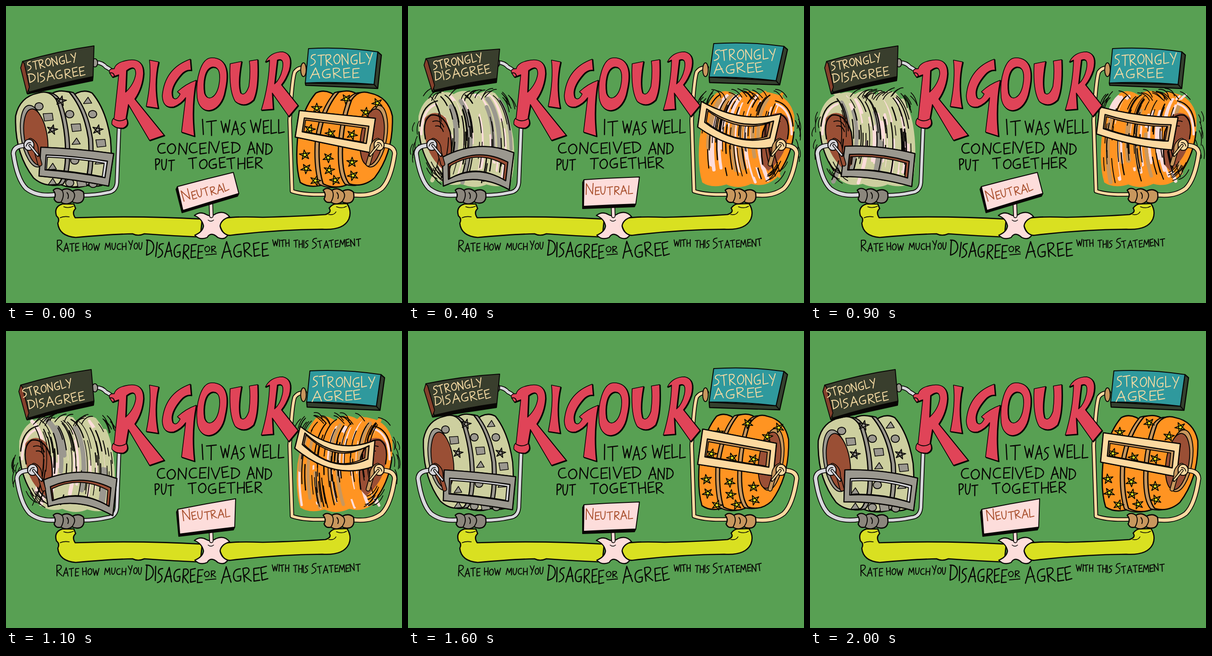
These frames come from a looping animation (864 px wide and 648 px high, 2.1 s). An HTML page:

```html
<!DOCTYPE html>
<html lang="en">
<head>
<meta charset="utf-8">
<title>Rigour</title>
<style>
html, body { margin: 0; width: 100%; height: 100%; overflow: hidden; background: #58a053; }
svg { display: block; width: 100vw; height: 100vh; }
path { stroke-linecap: round; stroke-linejoin: round; }
</style>
</head>
<body>
<svg id="stage" viewBox="0 0 864 648" role="img" aria-label="Rigour: it was well conceived and put together. Rate how much you disagree or agree with this statement. Strongly disagree, neutral, strongly agree."></svg>
<script>
const INK = '#080605', GREY = '#9b988f', PALE = '#d8d8dc', BROWN = '#9a4f35',
      TAN = '#c8975d', CREAM = '#fcd9a0', RED = '#e04458', LIME = '#d9e021',
      PINK = '#fddddb', BEIGE = '#cdcf9f', ORANGE = '#ff9422', SAND = '#f6dba3';

// Hand lettering: [width, strokes] on a cap height of 10.
const GLYPHS = {
  A: [7, 'M0 10.5L3.8 0L7 10M1.3 6.8L6.3 6'],
  C: [6, 'M5.6 1Q1 0 .4 5.5Q1 11 6 8.6'],
  D: [6.5, 'M.8 .8L.6 10Q7 8.5 6.3 4Q5 .3 0 .8'],
  E: [5, 'M5 .2L.4 .8L.6 9.7L5.2 9M.5 5.2L4.3 4.6'],
  G: [7, 'M5.8 .8Q.4 1 .4 6Q1 11 6 8.8L6.3 5.8L3.6 6.2'],
  H: [6, 'M.3 .3L.5 10M5.7 0L5.8 10M.4 5.6L5.8 4.8'],
  I: [1, 'M.6 0L.5 10'],
  L: [5, 'M.6 0L.4 9.8L5.2 9'],
  M: [8, 'M0 10L1.4 .8L4.3 7L7 .2L8 10'],
  N: [6.5, 'M.3 10L.4 .4L5.7 9.6L6.2 0'],
  O: [6.5, 'M3.6 1.2Q0 2.6 .4 6.2Q1.2 10.6 4.6 9Q7.6 6 5.8 2.4Q4.6 .6 3 1.4'],
  P: [5, 'M.6 10L.5 .6Q5.4 -.4 5 2.8Q4 5.6 .6 6'],
  R: [6, 'M.6 10L.5 .6Q5.6 -.4 5.2 2.6Q4 5 .8 5.6L6 10'],
  S: [5, 'M5 .6Q.4 .6 .9 3.8Q5 5.4 4.4 7.6Q3.2 9.8 0 10.4'],
  T: [6.5, 'M0 1L6.5 .2M3.2 .7L3.3 10'],
  U: [6, 'M.4 .4Q0 9 2.6 9.6Q5.4 9.4 5.6 0'],
  V: [6.5, 'M0 .4L3.2 9.8L6.4 0'],
  W: [9, 'M0 .6L2.4 9.6L4.6 2.6L6.6 9.4L9 0'],
  Y: [6, 'M0 .4L2.9 5M6 0L2 10.6']
};

const TITLE = [
  'M232 155L226 146Q223 136 236 137Q240 122 268 118Q300 114 300 147Q298 178 281 203L345 282L313 293L267 215L262 244Q270 260 256 266Q240 268 231 258Q230 248 236 244L246 150ZM263 141Q283 126 283 148Q280 170 261 188Z',
  'M313 118L333 122Q322 170 332 223L306 219Q318 160 313 118Z',
  'M402 116Q346 136 341 196Q342 224 366 220Q382 214 392 200L383 275L411 284Q404 220 415 162Q392 170 374 187L380 192Q372 208 364 200Q356 180 382 150Q392 138 404 140Z',
  'M449 113C485 113 486 150 478 185C470 235 423 243 417 200C413 160 425 113 449 113ZM451 133C432 136 430 170 433 190C440 210 458 200 464 175C469 150 466 132 451 133Z',
  'M489 126L514 121Q505 170 512 190Q522 198 530 175Q534 145 531 120L549 117Q552 180 540 205Q520 224 500 208Q486 185 489 126Z',
  'M566 122Q577 100 604 100Q627 105 618 140Q611 160 601 172L637 217L617 241L581 190L583 225L557 227Q574 170 575 118ZM592 118Q608 112 603 138Q598 160 586 170Z'
];

// Rows: text, x, baseline, height, angle, condensing, size of the first letter.
const BODY = [
  ['IT', 429, 282, 33, 0, 1], ['WAS', 470, 279, 28, 0, .76], ['WELL', 534, 279, 30, -1, .84],
  ['CONCEIVED', 330, 324, 25, -1, 1.17], ['AND', 527, 323, 25, 0, .92],
  ['PUT', 326, 358, 24, 0, .82], ['TOGETHER', 399, 356, 24, -1, 1.12],
  ['RATE', 111, 535, 18, 0, .85, 1.35], ['HOW', 168, 533, 16, 0, .9], ['MUCH', 216, 532, 15, 0, 1],
  ['YOU', 268, 531, 16, 0, .8, 1.15], ['DISAGREE', 305, 545, 31, 3, .73, 1.15], ['OR', 434, 538, 14, -2, 1.25],
  ['AGREE', 471, 550, 31, -3, .88, 1.1], ['WITH', 582, 525, 15, -1, .88], ['THIS', 628, 527, 16, 0, .84],
  ['STATEMENT', 668, 529, 16, -3, .94, 1.4]
];

const DRUM = [
  'M140 200Q165 178 188 190Q218 225 228 290Q233 350 222 385Q200 400 165 388Z',
  'M85 205Q105 178 138 188Q170 225 180 290Q184 350 172 388Q145 402 115 388Z',
  'M21 240Q30 198 70 190Q95 182 110 205Q130 260 130 320Q130 370 115 388Q85 397 60 375Q18 320 21 240Z'
];
const SYMBOLS = [
  ['o', 72, 219], ['s', 120, 207], ['t', 178, 207], ['q', 92, 242], ['o', 139, 236], ['o', 189, 236],
  ['s', 101, 270], ['q', 153, 265], ['s', 200, 270], ['q', 207, 299], ['t', 153, 296], ['t', 101, 351],
  ['o', 150, 337], ['t', 203, 339], ['t', 101, 384], ['o', 139, 386], ['q', 165, 386], ['o', 190, 388]
];
const STARS = [
  [678, 223], [742, 203], [785, 232], [810, 212], [663, 269], [708, 278], [755, 281], [652, 325],
  [703, 331], [755, 341], [655, 355], [705, 358], [757, 370], [675, 381], [718, 380]
];

// Three redrawings; corner lists run clockwise from top left, shifts are [at rest, spinning].
const POSES = [
  { text: [0, 0], drum: '', shift: [0, 0],
    no: [36, 121, 192, 87, 190, 154, 50, 188], noText: [[48, 141, -11], [51, 168, -8]],
    yes: [660, 93, 811, 100, 803, 171, 653, 168], yesText: [[665, 130, -2], [664, 158, -1]], depth: 5,
    mid: [374, 394, 496, 363, 508, 409, 386, 446], midText: [388, 427, -14],
    bars: [[76, 308, 235, 322, 224, 393, 72, 371, 3], [640, 228, 806, 245, 795, 320, 631, 286, 0]],
    spun: [[76, 306, 229, 322, 222, 394, 68, 372, 8], [632, 220, 803, 243, 790, 314, 625, 279, -8]] },
  { text: [-2, 0], drum: 'matrix(.94 0 0 1 14 -4)', shift: [6, 2],
    no: [39, 115, 200, 94, 194, 158, 57, 184], noText: [[56, 139, -10], [59, 163, -8]],
    yes: [667, 82, 820, 88, 803, 163, 657, 155], yesText: [[668, 119, -1], [668, 148, -2]], depth: 12,
    mid: [384, 379, 505, 373, 497, 432, 383, 437], midText: [388, 412, -1],
    bars: [[79, 303, 235, 318, 228, 390, 77, 370, 2], [643, 214, 804, 245, 797, 316, 632, 291, 0]],
    spun: [[75, 330, 231, 320, 221, 401, 77, 393, 26], [640, 208, 814, 235, 797, 308, 632, 264, -26]] },
  { text: [-1, 0], drum: 'translate(-3 -1)', shift: [-4, 8],
    no: [32, 118, 186, 84, 192, 153, 49, 190], noText: [[38, 145, -12], [50, 171, -9]],
    yes: [663, 87, 818, 95, 808, 164, 656, 155], yesText: [[669, 122, 1], [668, 154, -2]], depth: 11,
    mid: [375, 389, 501, 366, 499, 428, 379, 443], midText: [387, 415, -5],
    bars: [[76, 303, 235, 321, 226, 392, 74, 373, 8], [640, 222, 808, 246, 800, 318, 634, 286, 0]],
    spun: [[82, 325, 242, 322, 233, 403, 92, 383, 22], [642, 208, 805, 238, 800, 296, 630, 256, -36]] }
];

function random(seed) {
  return (lo = 0, hi = 1) => {
    seed = (seed * 16807) % 2147483647;
    return lo + (hi - lo) * seed / 2147483647;
  };
}

const group = (body, transform = '') => `<g transform="${transform}">${body}</g>`;
const shape = (d, fill, width = 2) =>
  `<path d="${d}" fill="${fill}" stroke="${INK}" stroke-width="${width}" fill-rule="evenodd"/>`;
const line = (d, color = INK, width = 2, extra = '') =>
  `<path d="${d}" fill="none" stroke="${color}" stroke-width="${width}" ${extra}/>`;
const tube = (d, color, width) => line(d, INK, width + 3.5) + line(d, color, width);
const poly = points => 'M' + points.map(p => p.join(' ')).join('L') + 'Z';
const oval = (x, y, rx, ry, fill, turn = 0) =>
  `<ellipse cx="${x}" cy="${y}" rx="${rx}" ry="${ry}" fill="${fill}" stroke="${INK}" stroke-width="2" transform="rotate(${turn} ${x} ${y})"/>`;

function word([text, x, y, height, angle = 0, condense = 1, lead = 1], color = INK, width = 2.1, seed = 7) {
  const rand = random(seed * 977 + text.length * 131), size = height / 10;
  let at = 0, out = '';
  [...text].forEach((letter, i) => {
    const [advance, d] = GLYPHS[letter], grow = i ? 1 : lead;
    out += group(line(d, color, width, 'vector-effect="non-scaling-stroke"'),
      `translate(${at} ${rand(-.5, .5)}) rotate(${rand(-4, 4)}) scale(${grow}) translate(0 -10)`);
    at += advance * grow + 1.6;
  });
  return group(out, `translate(${x} ${y}) rotate(${angle}) scale(${size * condense} ${size})`);
}

function star(x, y, r, fill, turn) {
  const points = [0, 2, 4, 1, 3].map(k => {
    const a = k * Math.PI * .4 - Math.PI / 2 + turn;
    return [(x + r * 1.1 * Math.cos(a)).toFixed(1), (y + r * Math.sin(a)).toFixed(1)];
  });
  return shape(poly(points), fill).replace('evenodd', 'nonzero');
}

function symbol([kind, x, y]) {
  if (kind === 's') return star(x, y, 11, GREY, .2);
  if (kind === 'o') return oval(x, y, 9, 8, GREY);
  if (kind === 't') return shape(`M${x - 9} ${y + 6}L${x + 1} ${y - 8}L${x + 9} ${y + 5}Z`, GREY, 1.6);
  return shape(`M${x - 11} ${y - 7}L${x + 9} ${y - 8}L${x + 11} ${y + 7}L${x - 8} ${y + 9}Z`, GREY, 1.6);
}

function hole(rim) {
  return oval(60, 284, 27, 68, rim, -9) + oval(65, 286, 25, 62, BROWN, -9);
}

function stillDrum(skin, groove) {
  const rings = DRUM.map((d, i) =>
    (i ? group(shape(d, groove, 2.5), 'translate(9 1)') : '') + shape(d, skin, 2.8));
  return rings.join('') + hole(groove);
}

function spinningDrum(skin, groove, seed) {
  const rand = random(seed * 7919 + 11);
  const many = (n, make) => Array.from({ length: n }, make).join('');
  // Each streak follows part of a curve that wraps round the drum.
  const streak = (color, width, min, max, lift = 0) => {
    const t = rand(), x = 36 + 150 * t, length = rand(min, max);
    const d = `M${x} ${193 - lift}C${x + 34} 210 ${x + 50} 300 ${x + 4 + 30 * t} ${392 - rand(0, 8)}`;
    return line(d, color, width, `stroke-dasharray="${length} 400" stroke-dashoffset="${-rand(0, 206 - length)}"`);
  };
  let out = DRUM.map(d => `<path d="${d}" fill="${skin}"/>`).join('');
  out += many(24, () => streak(PINK, rand(4, 9), 30, 120));
  out += many(14, () => streak(skin, rand(5, 10), 60, 180, 5));
  out += many(6, () => streak(groove, rand(6, 11), 60, 150));
  out += `<path d="M34 245Q56 222 80 244Q100 290 92 345L78 360Q42 330 36 290Z" fill="${BROWN}"/>`;
  out += line('M36 290Q28 250 48 238Q76 234 90 275Q96 310 90 345M24 262Q28 215 62 207M22 275Q26 320 52 360', INK, 2.8);
  out += line('M52 252q16 -6 24 12M58 262q12 -3 17 12', INK, 2);
  out += line('M27 280Q28 225 60 214', PINK, 5);
  out += many(52, () => streak(INK, rand(1.4, 2.8), 16, 75));
  // Whisks of air around the rim
  out += many(14, () => {
    const x = rand(50, 205), y = rand(178, 190);
    return line(`M${x} ${y}q${rand(-18, -8)} ${rand(-2, 3)} ${rand(-26, -18)} 17`, INK, 1.8);
  });
  out += many(8, () => line(`M${rand(8, 24)} ${rand(225, 330)}q-7 12 -4 ${rand(16, 34)}`, INK, 1.6));
  out += many(7, () => line(`M${rand(195, 222)} ${rand(184, 205)}q10 9 14 ${rand(18, 32)}`, INK, 1.7));
  out += many(9, () => line(`M${rand(36, 62)} ${rand(338, 362)}q8 18 22 ${rand(20, 28)}`, INK, 1.7));
  return out;
}

// A curved plate with a window; bend lifts the middle.
function bar([x0, y0, x1, y1, x2, y2, x3, y3, bend], fill, edge) {
  const at = (u, v) => [
    (x0 * (1 - u) + x1 * u) * (1 - v) + (x3 * (1 - u) + x2 * u) * v,
    (y0 * (1 - u) + y1 * u) * (1 - v) + (y3 * (1 - u) + y2 * u) * v
  ];
  const loop = (l, t, r, b) => {
    const top = at((l + r) / 2, t), low = at((l + r) / 2, b);
    return `M${at(l, t)}Q${top[0]} ${top[1] - bend * 1.4} ${at(r, t)}L${at(r, b)}Q${low[0]} ${low[1] - bend * 1.4} ${at(l, b)}Z`;
  };
  const frame = loop(0, 0, 1, 1);
  return shape(frame + loop(.1, .32, .89, .74), edge, 2) + shape(frame + loop(.08, .25, .93, .76), fill, 2.6);
}

function axle(metal, bracket) {
  return tube('M53 293Q67 300 66 317L74 345', bracket, 7) +
    tube('M48 304Q17 303 16 322Q24 378 44 398Q70 418 112 411', metal, 7.5) +
    oval(50, 303, 11, 12, metal) + line('M44 306q2 -9 10 -8', INK, 1.6) +
    line('M52 304L70 326', INK, 6) + line('M52 304L69 325', metal, 3);
}

function collar(x, fill) {
  return group(shape('M-34 402Q-26 394 -15 402Q-4 395 8 404Q22 397 32 406Q36 424 25 429Q15 432 7 427Q-4 436 -17 428Q-28 431 -32 421Q-26 411 -34 402Z', fill, 2.6) +
    line('M-15 402Q-8 412 -17 428M8 404Q18 412 7 427M-4 407q5 6 2 13'), `translate(${x} 0)`);
}

function face([x0, y0, x1, y1, x2, y2, x3, y3], fill, bulge, width = 2) {
  return shape(`M${x0} ${y0}Q${(x0 + x1) / 2} ${(y0 + y1) / 2 - bulge} ${x1} ${y1}L${x2} ${y2}Q${(x2 + x3) / 2} ${(y2 + y3) / 2 - bulge * .6} ${x3} ${y3}Z`, fill, width);
}

function signs(p, seed) {
  const [ax, ay, , , bx, by, cx, cy] = p.no;
  const [, , dx, dy, ex, ey, fx, fy] = p.yes;
  const [gx, gy, , , hx, hy, ix, iy] = p.mid;
  const label = (text, [x, y, angle], height, condense) =>
    word([text, x, y, height, angle, condense], SAND, 2, seed);
  return shape(poly([[cx, cy], [bx, by], [bx - 1, by + 9], [cx - 3, cy + 4]]), INK) +
    face(p.no, '#393e2d', 6) +
    shape(poly([[ax, ay], [ax - 4, ay + 14], [cx - 4, cy + 3], [cx + 1, cy - 11], [ax + 4, ay + 5]]), '#85412c', 1.8) +
    label('STRONGLY', p.noText[0], 19, .96) + label('DISAGREE', p.noText[1], 20, 1.14) +
    shape(poly([[dx, dy], [dx + 8, dy + 7], [ex + 8, ey + 9], [fx + 1, fy + p.depth], [fx, fy], [ex, ey]]), '#34412f', 2.4) +
    line(`M${ex} ${ey}l8 9`) + face(p.yes, '#2f999d', 8) +
    label('STRONGLY', p.yesText[0], 24, .94) + label('AGREE', p.yesText[1], 22, 1.32) +
    tube('M447 428L448 458', PINK, 6) +
    shape(poly([[gx, gy], [gx - 3, gy + 6], [ix - 2, iy + 5], [hx - 3, hy + 6], [hx, hy], [ix, iy]]), INK) +
    face(p.mid, PINK, 1) +
    word(['NEUTRAL', p.midText[0], p.midText[1], 18, p.midText[2], 1.05, 1.35], '#a9512f', 2, seed);
}

function arms() {
  return shape('M123 432Q104 438 110 458Q118 464 113 474Q116 502 152 505Q230 498 276 497Q288 503 302 497Q370 502 424 504L428 465Q290 457 151 462Q143 450 152 442L148 432Z', LIME, 2.6) +
    line('M118 462q8 -4 20 -2M126 438q10 4 21 -1', INK, 1.6) +
    shape('M464 467Q480 458 560 461Q640 459 697 455Q712 450 705 441Q712 432 719 432L744 431Q755 448 748 465Q736 490 690 487Q590 488 492 500Q470 504 464 467Z', LIME, 2.6) +
    line('M721 438q12 5 22 -1M704 455q12 2 16 -6', INK, 1.6) +
    shape('M411 457Q424 447 437 455Q447 461 458 453Q476 445 488 460Q469 466 467 480Q470 495 484 500Q476 512 462 505Q447 491 439 505Q423 512 412 500Q429 493 431 480Q428 464 411 457Z', PINK, 2.4) +
    line('M441 467q6 5 12 0', INK, 1.6);
}

function drawing(index, spinning) {
  const p = POSES[index], seed = index + 3;
  const bars = spinning ? p.spun : p.bars;
  const shift = `translate(${p.shift[+spinning]} 0)`;
  const mirror = 'matrix(-1 0 0 1 864 0)';
  const left = spinning
    ? group(spinningDrum(BEIGE, GREY, seed), shift)
    : group(stillDrum(BEIGE, GREY) + SYMBOLS.map(symbol).join(''), p.drum);
  const right = spinning
    ? group(spinningDrum(ORANGE, TAN, seed + 9), mirror)
    : group(group(stillDrum(ORANGE, TAN), p.drum), mirror) +
      STARS.map(([x, y], i) => star(x - index, y - index, 11, '#e6e022', i * .7)).join('');
  const title = TITLE.map(d =>
    group(shape(d, INK, 2), 'translate(1.4 1.2)') + shape(d, RED, 1.6)).join('');
  return tube('M247 258L242 385Q240 405 222 407Q195 413 168 413', PALE, 6) +
    tube('M696 411Q650 413 624 404L619 250Q624 160 630 144Q637 134 652 134', CREAM, 6) +
    tube('M192 124Q208 121 218 133Q226 137 236 145', PALE, 6) +
    oval(194, 124, 6, 9, GREY) + oval(649, 139, 6, 15, TAN) +
    left + bar(bars[0], GREY, spinning ? BROWN : PALE) + group(axle(PALE, BROWN), shift) +
    right + bar(bars[1], CREAM, TAN) + group(axle(CREAM, TAN), mirror) +
    arms() + collar(137, '#8b867c') + collar(726, TAN) + signs(p, seed) +
    title + line('M235 246q13 9 27 0M227 146q8 -2 10 8', INK, 2) +
    group(BODY.map(row => word(row, INK, row[3] > 20 ? 2.5 : 2, seed)).join('') +
      line('M436 543L459 541'), `translate(${p.text})`);
}

const stage = document.getElementById('stage');
stage.innerHTML = '<rect width="864" height="648" fill="#58a053"/>' +
  [0, 1, 2, 3, 4, 5].map(k => `<g class="pose" display="none">${drawing(k % 3, k > 2)}</g>`).join('');
const poses = [...stage.querySelectorAll('.pose')];
const LOOP = 2100, STEP = 100;
const start = performance.now();

function update(time) {
  const step = Math.floor((time % LOOP) / STEP);
  const spinning = step >= 3 && step < 12;
  const current = step % 3 + (spinning ? 3 : 0);
  poses.forEach((pose, k) => pose.setAttribute('display', k === current ? 'inline' : 'none'));
}

function tick() {
  update(performance.now() - start);
  requestAnimationFrame(tick);
}
tick();
</script>
</body>
</html>
```
